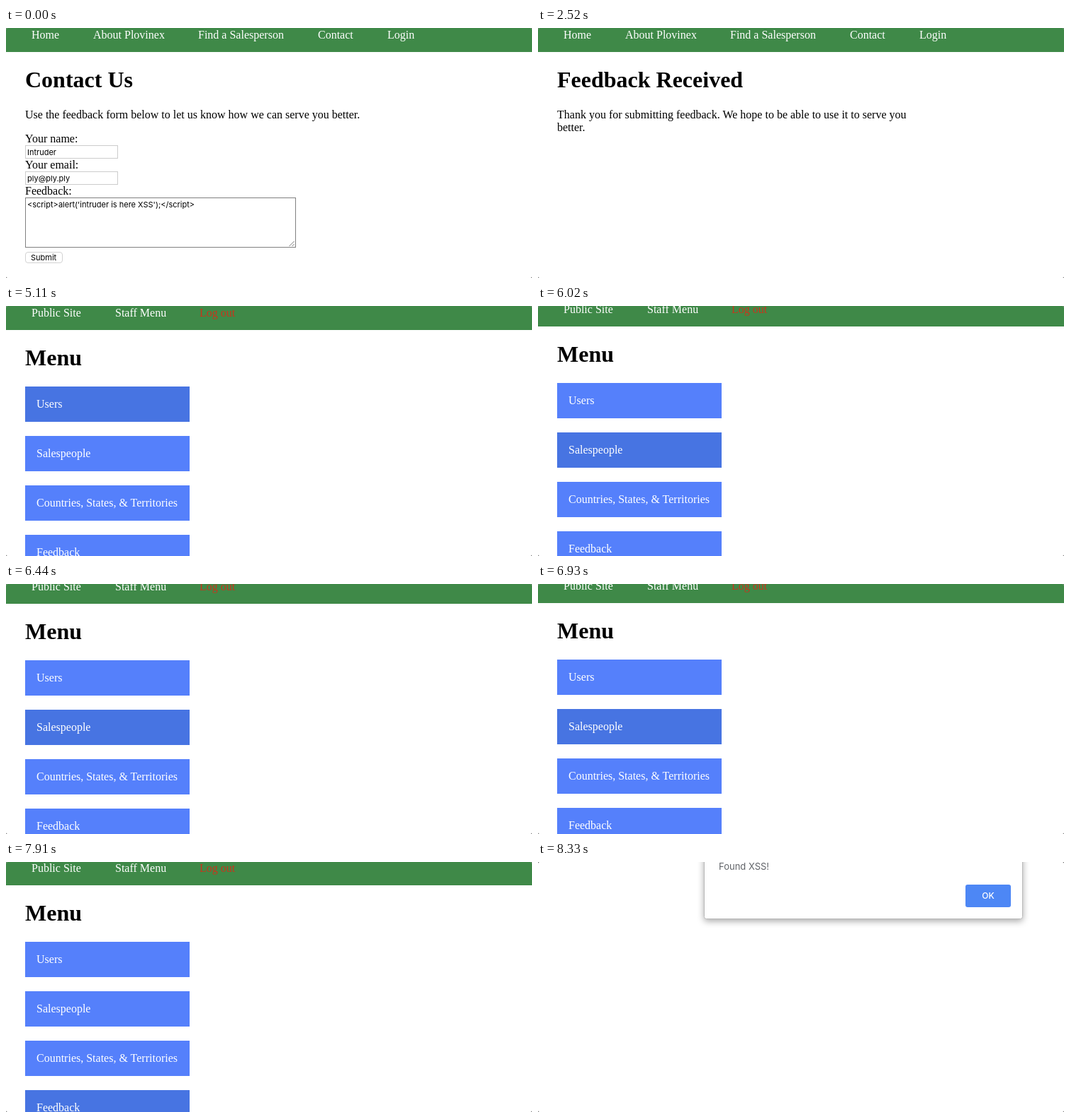
An HTML page that plays this animation: 742x354 px, repeating every 8470 ms.

```html
<!DOCTYPE html>
<html lang="en">
<head>
<meta charset="utf-8">
<title>Feedback form</title>
<style>
  html, body { margin: 0; width: 100%; height: 100%; overflow: hidden; background: #555; }
  svg { display: block; width: 742px; height: 354px; background: #fff; border-radius: 2.5px; }
  text { font: 16px "Liberation Serif", serif; }
  .title { font-size: 32px; font-weight: bold; }
  .bar { fill: #3f8948; }
  .nav text, .item text { fill: #fff; }
  .nav .logout { fill: #c8351c; }
  .ui { font: 11px Inter, sans-serif; }
  .input { fill: #fff; stroke: #ccc; }
  .area { fill: #fff; stroke: #808080; }
  .button rect { fill: #fff; stroke: #d2d2d2; }
  .button.pressed rect { fill: #4a8df6; stroke: #3d7de6; }
  .button.pressed text { fill: #fff; }
  .item rect { fill: #5580fb; }
  .item.hover rect { fill: #4774e2; }
  .panel { fill: #fff; stroke: #b9b9b9; filter: drop-shadow(0 3px 5px #0005); }
  .message { font: 13px Inter, sans-serif; fill: #606368; }
  .ok { font: 500 12px Inter, sans-serif; fill: #fff; text-anchor: middle; }
</style>
</head>
<body>
<svg viewBox="0 0 742 354">
  <g id="public" class="nav">
    <rect class="bar" width="742" height="34"/>
    <text x="36" y="15">Home</text>
    <text x="123" y="15">About Plovinex</text>
    <text x="271" y="15">Find a Salesperson</text>
    <text x="440" y="15">Contact</text>
    <text x="538" y="15">Login</text>
  </g>

  <g id="form">
    <text class="title" x="27" y="84">Contact Us</text>
    <text x="27" y="128">Use the feedback form below to let us know how we can serve you better.</text>
    <text x="27" y="162">Your name:</text>
    <rect class="input" x="27.5" y="166.5" width="130" height="18"/>
    <text class="ui" x="30" y="180">Intruder</text>
    <text x="27" y="199">Your email:</text>
    <rect class="input" x="27.5" y="203.5" width="130" height="18"/>
    <text class="ui" x="30" y="217">ply@ply.ply</text>
    <text x="27" y="236">Feedback:</text>
    <rect class="area" x="27.5" y="240.5" width="381" height="70"/>
    <text class="ui" x="30" y="254">&lt;script&gt;alert('intruder is here XSS');&lt;/script&gt;</text>
    <path d="M399.5 309l7-7M403.5 309l3-3" stroke="#777"/>
    <g id="submit" class="button">
      <rect x="27.5" y="317.5" width="52" height="15" rx="3.5"/>
      <text class="ui" x="35" y="329">Submit</text>
    </g>
  </g>

  <g id="thanks">
    <text class="title" x="27" y="84">Feedback Received</text>
    <text x="27" y="128">Thank you for submitting feedback. We hope to be able to use it to serve you</text>
    <text x="27" y="146">better.</text>
  </g>

  <g id="menu">
    <g class="nav">
      <rect class="bar" width="742" height="34"/>
      <text x="36" y="15">Public Site</text>
      <text x="154" y="15">Staff Menu</text>
      <text class="logout" x="273" y="15">Log out</text>
    </g>
    <text class="title" x="27" y="84">Menu</text>
    <g id="items"></g>
  </g>

  <g id="dialog">
    <rect class="panel" x="234.5" y="-60.5" width="449" height="141" rx="3"/>
    <text class="message" x="255" y="11">Found XSS!</text>
    <rect x="603" y="32" width="64" height="32" rx="3" fill="#4d87f5"/>
    <text class="ok" x="635" y="52">OK</text>
  </g>
</svg>
<script>
const LOOP = 8470, STEP = 70;
const SUBMITTED = 2520, MENU = 4550, LEAVE = 8190, ALERT = 8260;
const scrollKeys = [[4760, 0], [5110, 0], [6020, 5], [6930, 7], [7420, 3], [LEAVE, 0]];
const hoverTimes = [4620, 5600, 7770, 7910];

const $ = id => document.getElementById(id);
const show = (id, on) => $(id).style.display = on ? '' : 'none';

$('items').innerHTML = ['Users', 'Salespeople', 'Countries, States, &amp; Territories', 'Feedback']
  .map((label, i) => `<g class="item" transform="translate(27 ${114 + 70 * i})">
    <rect width="232" height="50"/><text x="16" y="30">${label}</text></g>`).join('');
const items = [...$('items').children];

function scrollAt(t) {
  const i = scrollKeys.findIndex(key => key[0] > t);
  if (i < 1) return 0;
  const [t0, y0] = scrollKeys[i - 1], [t1, y1] = scrollKeys[i];
  return Math.round(y0 + (y1 - y0) * (t - t0) / (t1 - t0));
}

function draw(now) {
  const t = Math.floor(now % LOOP / STEP) * STEP;
  show('public', t < MENU);
  show('form', t < SUBMITTED);
  show('thanks', t >= SUBMITTED && t < MENU);
  show('menu', t >= MENU && t < LEAVE);
  show('dialog', t >= ALERT);
  $('submit').classList.toggle('pressed', t >= 1960 && t < 2170);
  $('menu').setAttribute('transform', `translate(0 ${-scrollAt(t)})`);
  const hovered = hoverTimes.filter(start => t >= start).length - 1;
  items.forEach((item, i) => item.classList.toggle('hover', i === hovered));
  requestAnimationFrame(draw);
}
requestAnimationFrame(draw);
</script>
</body>
</html>
```
